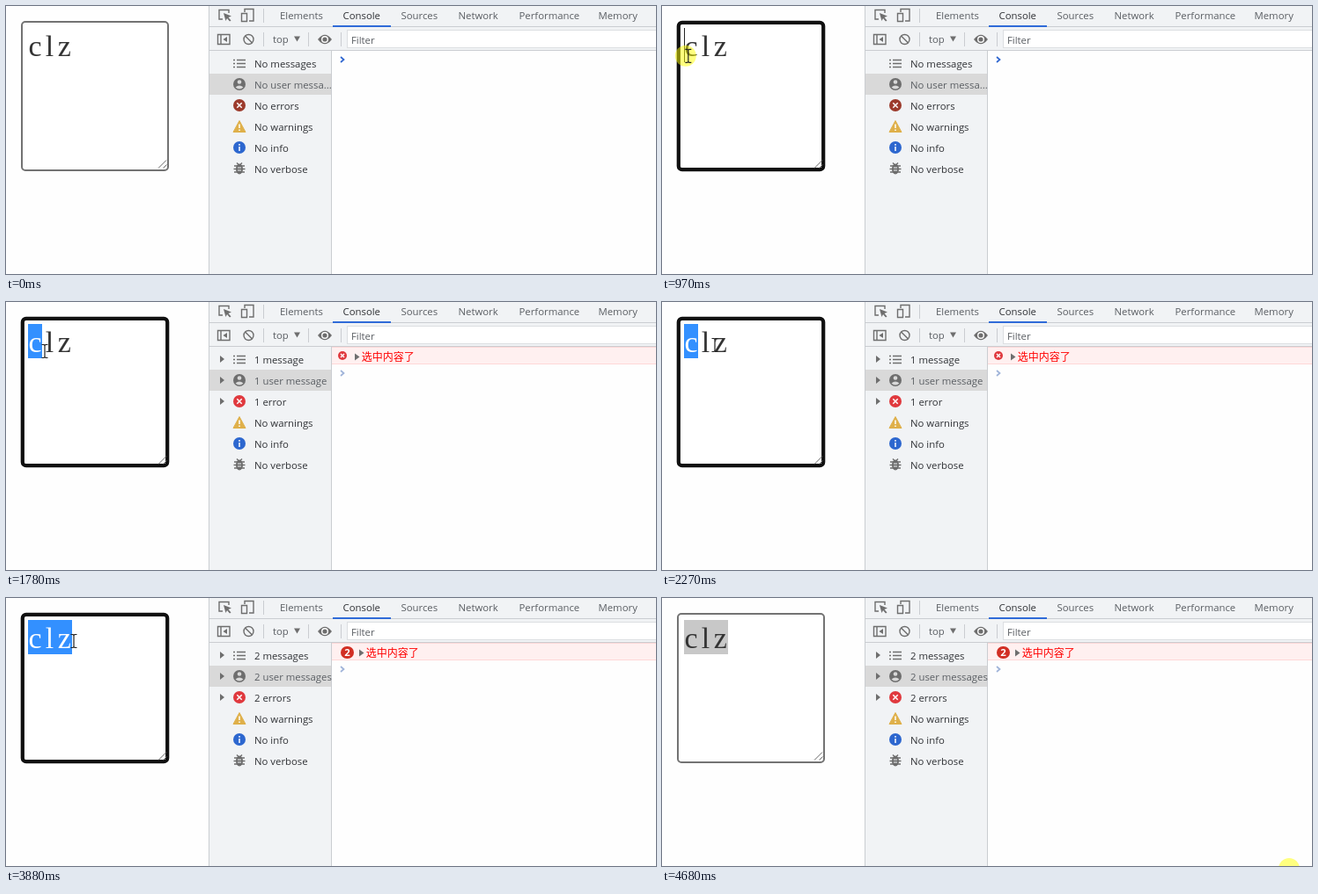
An HTML page for the animation above (4.75 s loop, 738 by 305 pixels).

```html
<!DOCTYPE html>
<html lang="en">
<head>
<meta charset="utf-8">
<title>Text selection and console</title>
<style>
  html, body { margin: 0; width: 100%; height: 100%; overflow: hidden; background: #fefefe; }
  svg { display: block; width: 738px; height: 305px; }
  text { font: 11.35px "Open Sans", "Noto Sans", sans-serif; fill: #303236; white-space: pre; }
  .tab { fill: #5a5e63; }
  .typed { font: 34px "Liberation Serif", serif; text-anchor: middle; fill: #333; }
  .error { font: 12px "Noto Sans CJK SC", "Noto Sans CJK", sans-serif; fill: #f00; }
  .badge { font-weight: 700; fill: #fff; text-anchor: middle; }
  .icon { fill: none; stroke: #6e6e6e; stroke-width: 1.4; }
  .solid { fill: #6e6e6e; }
  .cross { fill: none; stroke: #fff; stroke-width: 1.5; }
</style>
</head>
<body>
<svg viewBox="0 0 738 305">
  <!-- Text area -->
  <rect id="field" rx="4" fill="#fff"/>
  <path d="M173 184.500l9-9M178.500 184.500l4-4" stroke="#666" fill="none"/>
  <rect id="selection" x="25" y="25" height="39"/>
  <g id="letters"></g>
  <path id="caret" stroke="#222"/>

  <!-- Tool bars -->
  <rect x="230" width="508" height="51" fill="#f1f3f5"/>
  <rect x="230" y="51" width="140" height="254" fill="#f1f3f5"/>
  <path d="M230.500 0V305M231 23.500H738M231 50.500H738M369.500 51V305M292.500 30V46M343.500 30V46M380.500 30V46M292.500 3V19" stroke="#cacdd1" fill="none"/>
  <rect x="371" y="22" width="66" height="2" fill="#2f6bd8"/>
  <rect x="387.500" y="27.500" width="351" height="20" fill="#fff" stroke="#dcdee1"/>
  <rect x="231" y="77" width="138" height="24" fill="#d9d9d9"/>
  <g id="tabs"></g>
  <text x="303" y="42" class="tab">top</text>
  <path d="M327 34.500h7l-3.500 6z" class="solid"/>
  <text x="392" y="43" class="tab">Filter</text>
  <g class="icon">
    <path d="M246 15h-4V4.500h11V8"/>
    <path d="M247 8l9 3.500-3.500 1.500 3 3.500-1.500 1-3-3.500-1.500 3z" class="solid" stroke="none"/>
    <path d="M271 7V3.500h10V17h-5M267.500 8.500h6V17.500h-6z"/>
    <path d="M240.500 32.500h13.500v11H240.500zM244 32.500v11"/>
    <path d="M251 35v6l-4.500-3z" class="solid" stroke="none"/>
    <circle cx="275.500" cy="38" r="5.500"/><path d="M271.500 34l8 8"/>
    <path d="M355 38q7-9 14 0q-7 9-14 0z" class="solid"/>
    <circle cx="362" cy="38" r="3.300" fill="#6e6e6e" stroke="#fff"/>
  </g>

  <!-- Sidebar -->
  <g class="icon"><path d="M262 61.500h10M262 65.500h10M262 69.500h10M258 61.500h2M258 65.500h2M258 69.500h2"/></g>
  <circle cx="265" cy="89" r="7" class="solid"/>
  <circle cx="265" cy="86.500" r="2.300" fill="#d9d9d9"/>
  <path d="M260.500 92.500q4.500-4 9 0q-4.500 4-9 0z" fill="#d9d9d9"/>
  <circle id="errorDot" cx="265" cy="113" r="7"/>
  <path d="M262.300 110.300l5.400 5.400m0-5.400l-5.400 5.400" class="cross"/>
  <path d="M265 130.500l7 13h-14z" fill="#dfb04a" stroke="#dfb04a" stroke-linejoin="round"/>
  <path d="M265 134.500v4.500m0 1.500v1.500" class="cross"/>
  <circle cx="265" cy="161" r="7" fill="#2d67cf"/>
  <path d="M265 157v1.700m0 1.300v5" class="cross"/>
  <ellipse cx="265" cy="185.500" rx="4" ry="6" class="solid"/>
  <path d="M259 182h12M258.500 185.500h13M259 189h12M262 178.500l2 2M268 178.500l-2 2" class="icon"/>
  <path d="M263 184h4M263 187h4" stroke="#f1f3f5"/>
  <path id="expanders" d="M243 61l5 4-5 4zm0 24l5 4-5 4zm0 24l5 4-5 4z" class="solid"/>
  <g id="rows"></g>

  <!-- Console -->
  <g id="message">
    <rect x="370" y="51" width="368" height="20" fill="#fff0f0"/>
    <path d="M370 51.500H738M370 70.500H738" stroke="#ffd7d7"/>
    <g id="single">
      <circle cx="382" cy="61" r="5" fill="#e0393e"/>
      <path d="M380 59l4 4m0-4l-4 4" class="cross"/>
    </g>
    <g id="repeated">
      <rect x="380" y="55" width="15" height="14" rx="7" fill="#d22f24"/>
      <text x="387.500" y="66" class="badge">2</text>
    </g>
    <g id="content">
      <path d="M396 58.500l5.500 4-5.500 4z" class="solid"/>
      <text x="403.700" y="66.500" class="error">选中内容了</text>
    </g>
  </g>
  <path id="prompt" d="M380 58l3.500 3-3.500 3" fill="none" stroke-width="1.700"/>

  <!-- Pointer -->
  <circle id="press" r="12" fill="#ff0" fill-opacity=".5"/>
  <path id="beam" d="M-3.500-7.500h2.500l1 1 1-1h2.500M0-6.500V6.500M-3.500 7.500h2.500l1-1 1 1h2.500" fill="none" stroke="#222" stroke-width="1.200"/>
  <path id="arrow" d="M0 0v16l3.700-3.500 2.500 6 2.500-1-2.500-5.800h5.300z" fill="#fff" stroke="#111"/>
</svg>
<script>
const LOOP = 4750, TICK = 67;
const byId = id => document.getElementById(id);
const set = (id, attributes) => {
  for (const [name, value] of Object.entries(attributes)) byId(id).setAttribute(name, value);
};
const show = (id, visible) => set(id, { visibility: visible ? 'visible' : 'hidden' });
const within = (t, from, to) => t >= from && t < to;

// Adds a text element to a group and returns it.
function addText(group, x, y, content, className = '') {
  const node = document.createElementNS('http://www.w3.org/2000/svg', 'text');
  node.setAttribute('x', x);
  node.setAttribute('y', y);
  node.setAttribute('class', className);
  node.textContent = content;
  return byId(group).appendChild(node);
}

[['Elements', 311], ['Console', 382.5], ['Sources', 448.5], ['Network', 513.5], ['Performance', 582.5], ['Memory', 672.5]]
  .forEach(([name, x]) => addText('tabs', x, 15, name, name === 'Console' ? '' : 'tab'));

const letters = [...'clz'].map((letter, i) => addText('letters', 33 + i * 16.6, 57, letter, 'typed'));
const rows = Array.from({ length: 6 }, (_, i) => addText('rows', 282, 70 + i * 24, '', i === 1 ? 'tab' : ''));

function rowLabels(count) {
  const rest = ['No warnings', 'No info', 'No verbose'];
  if (!count) return ['No messages', 'No user messa...', 'No errors', ...rest];
  const plural = count > 1 ? 's' : '';
  return ['message', 'user message', 'error'].map(noun => `${count} ${noun}${plural}`).concat(rest);
}

// Pointer strokes: start, end, from, to, easing
const easeOut = p => 1 - (1 - p) ** 2;
const easeIn = p => p ** 1.75;
const linear = p => p;
const strokes = [
  [70, 550, [361, 228], [44, 69], easeOut],
  [620, 900, [44, 69], [27, 57], linear],
  [900, 1310, [27, 57], [44, 56], linear],
  [1780, 2270, [44, 56], [60, 49], easeOut],
  [2800, 3070, [60, 49], [77, 49], linear],
  [3880, 4150, [77, 49], [702, 224], easeIn],
  [4410, 4680, [702, 224], [715, 308], linear],
];

// The pointer is sampled once per tick, so it advances in small jumps.
function pointerAt(t) {
  const stroke = strokes.filter(s => s[0] <= t).pop();
  if (!stroke) return null;
  const [start, end, from, to, ease] = stroke;
  const p = ease(Math.min(1, Math.floor((t - start) / TICK) / Math.floor((end - start) / TICK)));
  return from.map((v, i) => v + (to[i] - v) * p);
}

function selectedLetters(t) {
  if (t >= 2800) return 3;
  return within(t, 1030, 2340) ? 1 : 0;
}

// Strokes the field inside a fixed outer edge.
function drawField(stroke, width, outer) {
  const inset = outer + width / 2;
  set('field', { x: inset, y: inset, width: 202 - 2 * inset, height: 205 - 2 * inset, stroke, 'stroke-width': width });
}

function draw(t) {
  const pointer = pointerAt(t);
  const [x, y] = pointer || [0, 0];
  const inField = !!pointer && x < 186 && y < 189;
  const focused = within(t, 900, 4610);
  const pressed = within(t, 900, 1510) || within(t, 2340, 2470) || within(t, 2800, 3350) || t >= 4610;
  const selected = selectedLetters(t);
  const count = t < 1510 ? 0 : t < 3350 ? 1 : 2;

  if (focused) drawField('#101010', 4.2, 16.7);
  else drawField(inField ? '#4f4f4f' : '#737373', 2, 17);
  set('selection', { width: [0, 16, 0, 50][selected], fill: t < 4610 ? '#3390ff' : '#c8c8c8' });
  letters.forEach((node, i) => { node.style.fill = focused && i < selected ? '#fff' : ''; });
  set('caret', { d: `M${t < 1100 ? 25.5 : 58.5} 25v39` });
  show('caret', focused && !selected);

  rowLabels(count).forEach((label, i) => {
    if (rows[i].textContent !== label) rows[i].textContent = label;
  });
  set('errorDot', { fill: count ? '#e0393e' : '#9c3b2c' });
  show('expanders', count);
  for (const [id, visible] of [['message', count], ['single', count === 1], ['repeated', count === 2]]) {
    set(id, { display: visible ? 'inline' : 'none' });
  }
  set('content', { transform: `translate(${count === 2 ? 5 : 0})` });
  set('prompt', { transform: `translate(0 ${count ? 20 : 0})`, stroke: count ? '#9fb3d9' : '#2f66d0' });

  show('press', pressed);
  set('press', { cx: x - 3, cy: y });
  show('beam', inField);
  set('beam', { transform: `translate(${x} ${y})`, opacity: selected === 3 && x < 75 ? 0.3 : 1 });
  show('arrow', pointer && !inField);
  set('arrow', { transform: `translate(${x} ${y})` });
}

function frame() {
  draw(performance.now() % LOOP);
  requestAnimationFrame(frame);
}
frame();
</script>
</body>
</html>
```
